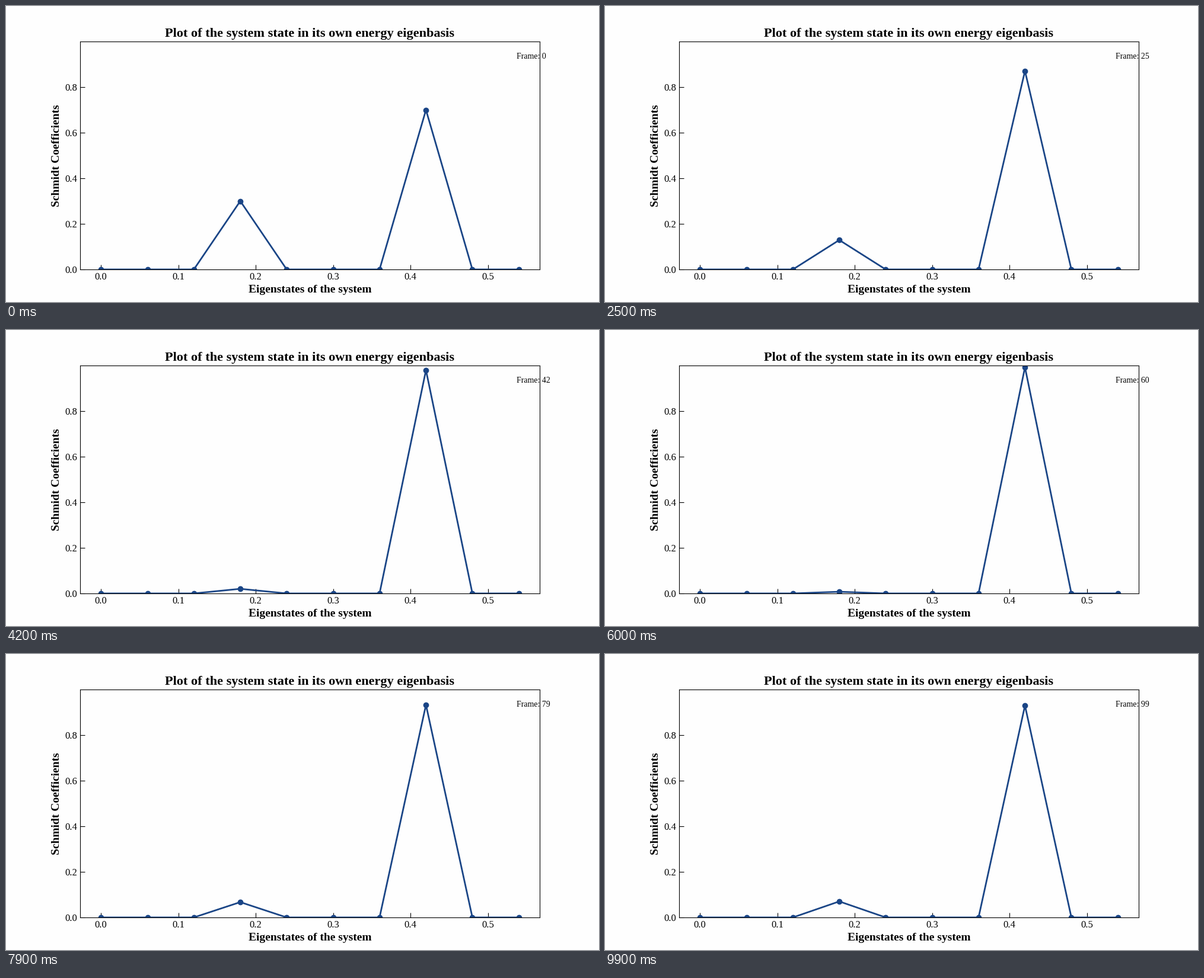
Recreate the animation shown at these times as a matplotlib script. Size 1000x500 px, loop 10 s.

```python
import matplotlib.pyplot as plt
import numpy as np
from matplotlib.animation import FuncAnimation

plt.rcParams["font.family"] = "Liberation Serif"

FRAMES, INTERVAL = 100, 100
BLUE = "#1a4586"
BACK = "#fefefe"

# Population of the lower level at a few moments: (frame, value)
KNOTS = np.array([
    (0, 0.3), (14, 0.19), (25, 0.129), (33, 0.072), (42, 0.0203),
    (44, 0.0185), (52, 0.004), (60, 0.0075), (66, 0.040), (77, 0.060),
    (79, 0.0672), (88, 0.088), (99, 0.0703),
])
KX, KY = KNOTS.T
SLOPES = np.gradient(KY, KX)


def lower_population(t):
    """Smooth cubic Hermite curve through the knots."""
    k = min(np.searchsorted(KX, t, side="right") - 1, len(KX) - 2)
    h = KX[k + 1] - KX[k]
    u = (t - KX[k]) / h
    ease = u * u * (3 - 2 * u)
    value = KY[k] + (KY[k + 1] - KY[k]) * ease
    value += h * u * (1 - u) * (SLOPES[k] * (1 - u) - SLOPES[k + 1] * u)
    return max(value, 0.0)


def coefficients(t):
    p = lower_population(t)
    values = np.zeros(10)
    values[3], values[7] = p, 1 - p
    return values


energies = 0.06 * np.arange(10)

fig = plt.figure(figsize=(10, 5), dpi=100, facecolor=BACK)
ax = fig.add_axes([0.125, 0.11, 0.775, 0.77], facecolor=BACK)
ax.set_xlim(-0.027, 0.567)
ax.set_ylim(0, 1)
ax.set_xticks(np.arange(6) / 10)
ax.set_yticks(np.arange(5) / 5)
ax.tick_params(direction="in", length=6, labelsize=12)
ax.set_title("Plot of the system state in its own energy eigenbasis",
             fontsize=16, fontweight="bold")
ax.set_xlabel("Eigenstates of the system", fontsize=14, fontweight="bold")
ax.set_ylabel("Schmidt Coefficients", fontsize=14, fontweight="bold")

line, = ax.plot(energies, coefficients(0), "o-", color=BLUE, lw=2, ms=6)
label = ax.text(0.95, 0.95, "Frame: 0", transform=ax.transAxes,
                fontsize=10, va="top")


def update(i):
    line.set_ydata(coefficients(i))
    label.set_text(f"Frame: {i}")
    return line, label


anim = FuncAnimation(fig, update, frames=FRAMES, interval=INTERVAL,
                     init_func=lambda: update(0), repeat=True, repeat_delay=0)
plt.show()
```
